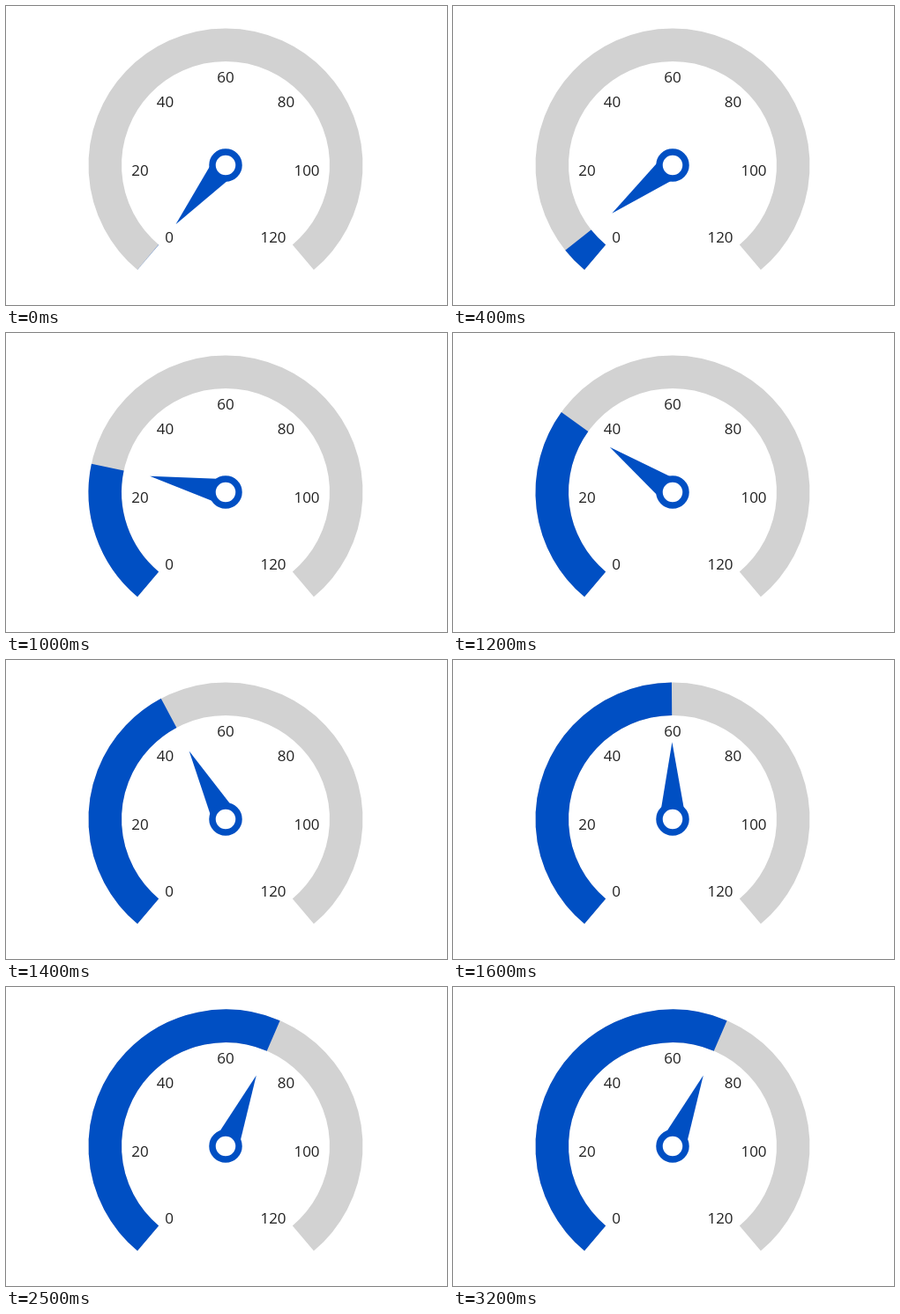
These frames come from a looping animation (500 px wide and 340 px high, 3.3 s). An HTML page:

```html
<!DOCTYPE html>
<html lang="en">
<head>
<meta charset="utf-8">
<title>Gauge</title>
<style>
  html, body { margin: 0; width: 100%; height: 100%; overflow: hidden; background: #fff; }
  svg { display: block; width: 500px; height: 340px; }
  .arc { fill: none; stroke-width: 37.5; }
  text { font: 17px "Open Sans", "Noto Sans", sans-serif; fill: #212121; text-anchor: middle; }
</style>
</head>
<body>
<svg viewBox="0 0 500 340">
  <g id="labels"></g>
  <g transform="translate(249 181)">
    <path class="arc" id="track" stroke="#d2d2d2"/>
    <path class="arc" id="bar" stroke="#004fc3" pathLength="280"/>
    <path id="needle" fill="#004fc3" d="M-15 0L0 -87.8L15 0Z"/>
    <circle r="15" fill="#fff" stroke="#004fc3" stroke-width="7.5"/>
  </g>
</svg>
<script>
  const LOOP = 3300, STEP = 100, SWEEP = 1800, LEAD = 33;
  const START = -140, SPAN = 280, VALUE = 70, MAX = 120;
  const $ = id => document.getElementById(id);

  // Mid-line of the ring, open at the bottom
  const r = 136.75, rad = START * Math.PI / 180;
  const x = r * Math.sin(rad), y = -r * Math.cos(rad);
  for (const id of ["track", "bar"])
    $(id).setAttribute("d", `M${x} ${y}A${r} ${r} 0 1 1 ${-x} ${y}`);

  const spots = [[185, 269], [152, 193], [180.5, 115], [249, 87], [317.5, 115], [341, 193], [303, 269]];
  $("labels").innerHTML = spots
    .map(([x, y], i) => `<text x="${x}" y="${y}">${i * 20}</text>`).join("");

  function draw(time) {
    const t = Math.floor(time % LOOP / STEP) * STEP;
    const p = Math.min(1, (t + LEAD) / SWEEP);
    const turn = SPAN * VALUE / MAX * (1 - Math.cos(p * Math.PI / 2));
    $("bar").setAttribute("stroke-dasharray", `${turn} 999`);
    $("needle").setAttribute("transform", `rotate(${START + turn})`);
  }

  const begin = performance.now();
  function tick() {
    draw(performance.now() - begin);
    requestAnimationFrame(tick);
  }
  tick();
</script>
</body>
</html>
```
